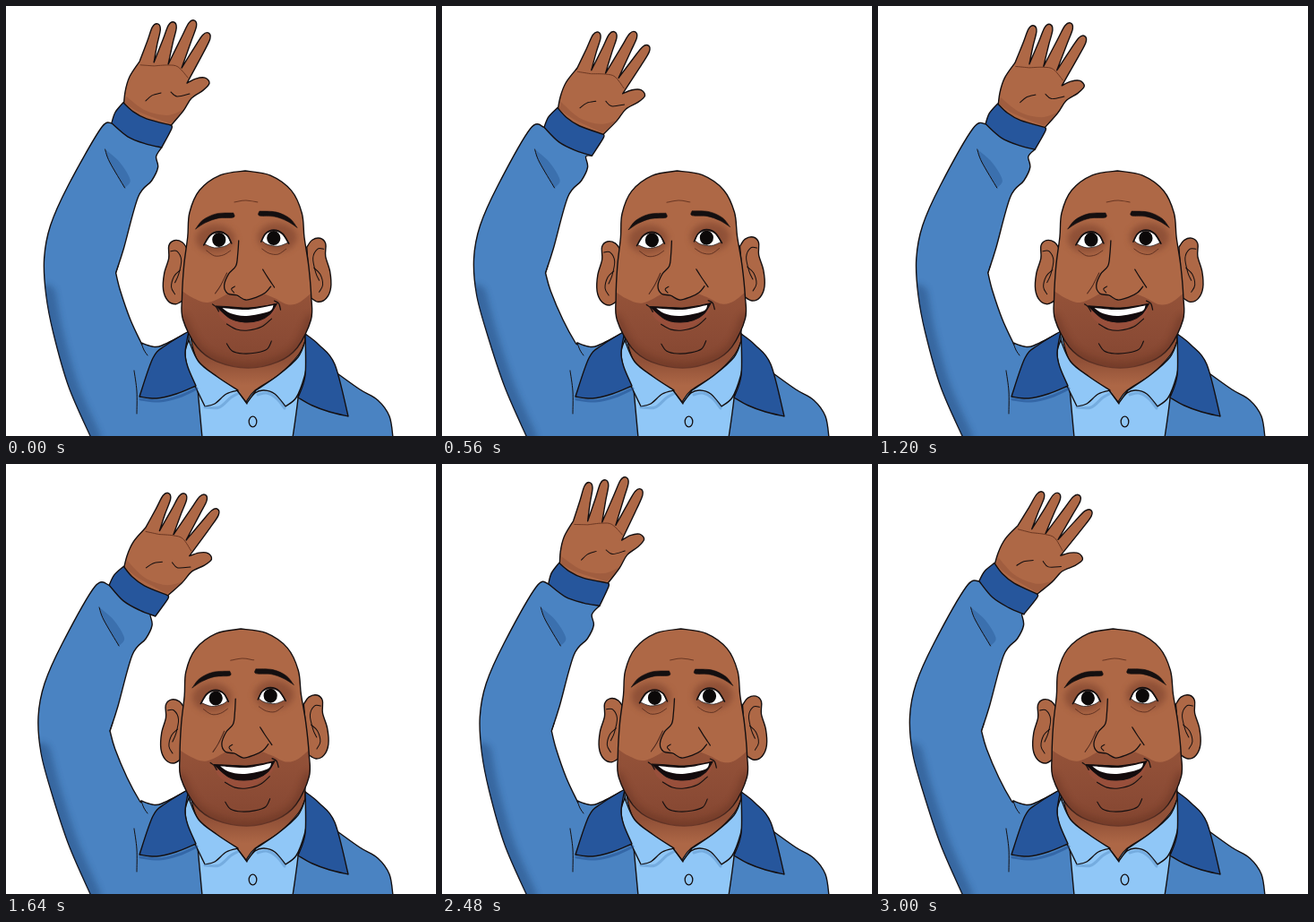
Animation, 480 px wide and 480 px high, one loop 3040 ms. Source, as an HTML page:

```html
<!DOCTYPE html>
<html lang="en">
<head>
<meta charset="utf-8">
<title>Waving man</title>
<style>
html, body { margin: 0; width: 100%; height: 100%; overflow: hidden; background: #fff; }
svg { display: block; width: 100vw; height: 100vh; }
path, ellipse { stroke-linejoin: round; stroke-linecap: round; }
</style>
</head>
<body>
<svg viewBox="0 0 480 480">
  <defs>
    <linearGradient id="beard" x1="0" y1="0" x2="0" y2="1">
      <stop offset="0" stop-color="#955339"/>
      <stop offset=".6" stop-color="#8b4b35"/>
      <stop offset="1" stop-color="#82452f"/>
    </linearGradient>
    <linearGradient id="neck" x1="0" y1="0" x2="0" y2="1">
      <stop offset=".5" stop-color="#905037"/>
      <stop offset=".8" stop-color="#ad6746"/>
    </linearGradient>
    <linearGradient id="headEdge" x1="0" y1="0" x2="0" y2="1">
      <stop offset=".85" stop-color="#140f10"/>
      <stop offset="1" stop-color="#6b3828"/>
    </linearGradient>
    <filter id="soft" x="-40%" y="-40%" width="180%" height="180%"><feGaussianBlur stdDeviation="3.5"/></filter>
    <clipPath id="jacketClip"><path id="jacketClipPath"/></clipPath>
    <clipPath id="headClip"><path id="headClipPath"/></clipPath>
  </defs>
  <g id="jacket"></g>
  <g id="torso"></g>
  <g id="head"></g>
  <g id="hand"></g>
</svg>
<script>
const LOOP = 3040, STEP = 40, SWING = 1225, PEAK = 2360;
const INK = '#140f10', SKIN = '#ae6846', BLUE = '#4a83c2', NAVY = '#26569c', SHIRT = '#90c7f7';
const byId = id => document.getElementById(id);
const round = n => Math.round(n * 100) / 100;
const parse = text => text.trim().split(/\s+/).map(p => p.split(',').map(Number));

// Smooth curve through points; continues from the current pen position.
function spline(pts) {
  let d = '';
  for (let i = 0; i < pts.length - 1; i++) {
    const a = pts[i - 1] || pts[i], b = pts[i], c = pts[i + 1], e = pts[i + 2] || c;
    d += 'C' + [b[0] + (c[0] - a[0]) / 6, b[1] + (c[1] - a[1]) / 6,
      c[0] - (e[0] - b[0]) / 6, c[1] - (e[1] - b[1]) / 6, c[0], c[1]].map(round).join(' ');
  }
  return d;
}

// Each run is smooth; runs meet in corners.
function joinRuns(runs) {
  let last = null, d = 'M' + runs[0][0].map(round).join(' ');
  for (const run of runs) {
    d += spline(last ? [last, ...run] : run);
    last = run[run.length - 1];
  }
  return d;
}
const toRuns = text => text.split('|').map(parse);
const trace = text => joinRuns(toRuns(text));

function add(parent, tag, attrs) {
  const el = document.createElementNS('http://www.w3.org/2000/svg', tag);
  for (const key in attrs) el.setAttribute(key, attrs[key]);
  return (parent.nodeType ? parent : byId(parent)).appendChild(el);
}
const shape = (parent, text, fill, width = 1.4, extra = {}) =>
  add(parent, 'path', { d: trace(text) + 'Z', fill, stroke: width ? INK : 'none', 'stroke-width': width, ...extra });
const line = (parent, text, width = 1.1, extra = {}) =>
  add(parent, 'path', { d: trace(text), fill: 'none', stroke: INK, 'stroke-width': width, ...extra });
const oval = (parent, cx, cy, rx, ry, fill, extra = {}) =>
  add(parent, 'ellipse', { cx, cy, rx, ry, fill, ...extra });

// Draws a left-hand part and its mirror image.
function pair(parent, width, lift, draw) {
  draw(add(parent, 'g', {}));
  draw(add(parent, 'g', { transform: `translate(${width} ${-lift}) scale(-1 1)` }));
}

// Jacket
const OUTER = parse('106,137 70,200 50,245 43,282 45,322 53,365 70,425 95,482');
const INNER = parse('151,376 139,350 128,318 123,298 132,270 148,213 163,195 170,180 168,168');
const FOLD = parse('111,160 116,174 133,203');
const SHOULDERS = toRuns('432,482 | 428,458 415,440 395,428 367,408 | 334,366 | 204,364 | 174,379 163,380 151,376');
const jacket = add('jacket', 'path', { fill: BLUE, stroke: INK, 'stroke-width': 1.4 });
const armShade = add('jacket', 'path', { fill: 'none', stroke: '#1f406f', 'stroke-width': 22, opacity: .4,
  filter: 'url(#soft)', 'clip-path': 'url(#jacketClip)' });
const foldShade = add('jacket', 'path', { fill: '#386ca9', opacity: .8 });
const fold = add('jacket', 'path', { fill: 'none', stroke: INK });
const elbow = add('jacket', 'path', { fill: 'none', stroke: INK });
line('jacket', '151,376 154,384 158,390', 1);
line('jacket', '143,407 146,430 146,455', 1);

// Neck, shirt and collars
shape('torso', '203,364 214,428 | 219,482 | 320,482 | 326,438 333,366', SHIRT);
shape('torso', '204,360 213,394 234,413 258,429 | 268,442 | 278,429 304,412 326,390 334,374 | 334,350 | 204,350', 'url(#neck)', 1.2);
shape('torso', '204,373 200,387 204,408 222,447 | 233,444 246,433 259,429 | 236,414 215,397 204,373', SHIRT);
shape('torso', '334,374 326,392 304,412 279,429 | 269,443 | 278,432 288,429 300,433 312,447 | 324,437 333,414 338,388', SHIRT);
line('torso', '222,448 238,448 251,437 260,432', 3, { stroke: '#659bd0', opacity: .6 });
line('torso', '281,434 291,432 302,438 311,449', 3, { stroke: '#659bd0', opacity: .6 });
line('torso', '258,429 269,444', 1.3);
oval('torso', 275.5, 464, 4.3, 5.8, SHIRT, { stroke: INK, 'stroke-width': 1.3 });
shape('torso', '204,363 178,379 164,393 149,436 | 168,438 190,433 212,424 | 203,403 200,387 204,363', NAVY);
shape('torso', '334,366 349,378 367,400 382,458 | 361,453 342,446 326,437 | 334,412 334,366', NAVY);
line('torso', '150,439 171,441 193,436 213,427', 3, { stroke: '#1f4d8d', opacity: .5 });

// Head: one traced side, the other reflected in a slightly leaning axis
const half = parse('266,184 238,189 215,206 204,231 202,258 198,290 196,325 197,350 213,381 235,397 270,404');
const reflected = half.slice(1, -1).reverse().map(([x, y]) => [532 + (y - 184) * .03 - x, y]);
const skull = joinRuns([[...half, ...reflected, half[0]]]);
const inHead = { 'clip-path': 'url(#headClip)' };
byId('headClipPath').setAttribute('d', skull);
pair('head', 537, 3, ear => {
  shape(ear, '202,272 196,264 187,262 181,268 181,282 176,299 175,317 180,329 189,333 198,328', SKIN);
  line(ear, '183,274 190,274 195,284 192,300 188,309', 1);
  line(ear, '194,295 187,302 184,314 188,322', 1);
});
add('head', 'path', { d: skull, fill: SKIN });
shape('head', '190,314 208,326 226,331 249,320 | 268,328 287,321 | 299,326 314,333 328,330 346,315 | 346,410 | 190,410',
  'url(#beard)', 0, inHead);
const jaw = add('head', 'g', inHead);
line(jaw, '196,350 212,381 235,397 270,404 304,397 326,381 340,350', 12, { stroke: '#592a1c', opacity: .35, filter: 'url(#soft)' });
add('head', 'path', { d: skull, fill: 'none', stroke: 'url(#headEdge)', 'stroke-width': 1.4 });
line('head', '254,219 267,217 280,219', 1, { stroke: '#6b3824' });

// Eyes and brows
pair('head', 535, 2, eye => {
  oval(eye, 233, 260, 22, 16, '#763e2a', { opacity: .55, filter: 'url(#soft)' });
  shape(eye, '221,266 228,256 237,253 246,256 250,264 | 244,268 232,270 221,266', '#fff', .7);
  oval(eye, 237, 261, 7.6, 8, '#0c0909');
  line(eye, '220,267 227,256 237,252 246,256 251,265', 1.6);
  line(eye, '223,273 232,279 242,278 250,273', .9, { stroke: '#5b2e20' });
  shape(eye, '211,249 219,239 234,232 253,231 | 253,236 236,237 222,242 211,249', INK, .6);
});

// Nose and cheeks
line('head', '259,262 258,277 256,290 248,299 243,312 247,321 257,323 267,328 279,325 289,320 295,313', 1.3);
line('head', '286,294 291,302 299,314', 1.2);
line('head', '255,313 251,316 254,320', 1);
line('head', '246,298 239,312 233,321', 1, { stroke: '#4b271d' });

// Mouth and chin
shape('head', '235,335 268,338 301,331 | 297,346 268,362 241,350 235,335', '#984f3b', 0);
shape('head', '234,335 252,336 270,337 287,335 302,332 | 294,344 282,351 266,353 250,349 234,335', '#130b0d', 1);
shape('head', '241,337 270,339 298,334 | 293,341 268,346 250,343 241,337', '#fff', 0);
line('head', '230,333 234,336 237,341', 1.2);
line('head', '299,329 304,332 306,339', 1.2);
line('head', '246,355 257,361 270,362 285,358 296,349');
line('head', '246,377 252,385 264,388 279,387 291,383 296,374');

// Hand: every finger is a rounded taper from its base to its tip
const WRIST = [157, 122], BASE_ANGLE = 26;
const TIPS = parse('169,20 187,18 210,16 226,30');
const BASES = parse('149,62 165,63 181,65 196,69 202,86');
const fingers = TIPS.map(([x, y], i) => {
  const a = BASES[i], b = BASES[i + 1];
  const dx = x - (a[0] + b[0]) / 2, dy = y - (a[1] + b[1]) / 2, len = Math.hypot(dx, dy);
  const ux = dx / len, uy = dy / len;
  const side = (back, out) => [x - ux * back - uy * out, y - uy * back + ux * out];
  return [side(22, -5.8), side(5, -4.6), [x, y], side(5, 4.6), side(22, 5.8), b];
});
add('hand', 'path', { fill: SKIN, stroke: INK, 'stroke-width': 1.4, d: joinRuns([
  parse('131,118 133,96 138,79 149,62'), ...fingers,
  parse('212,81 222,80 227,86 220,94 207,103 198,117 182,136'), parse('158,142')]) + 'Z' });
shape('hand', '133,109 150,119 183,131 | 192,124 198,116 | 180,122 156,117 134,101', '#7f432e', 0, { opacity: .3 });
line('hand', '156,106 163,100 173,97', 1);
line('hand', '184,96 191,101 205,98', 1);
line('hand', '150,66 165,67 | 181,66 192,68 203,80', .9, { stroke: '#683521' });
shape('hand', '131,108 142,118 157,126 184,133 | 185,137 174,158 | 156,154 136,146 118,131 | 122,119 131,108', NAVY);
const CUFF_ENDS = [[118, 131], [174, 158]];

const swing = t => Math.cos(2 * Math.PI * (t - PEAK) / SWING);

// The arm swings steadily while the hand's turn grows over the loop.
function poseAt(t) {
  const u = t / LOOP, drift = -Math.cos(2 * Math.PI * u), early = swing(t + 60);
  return {
    sway: (1 + swing(t)) / 2,
    angle: 29.4 - (2 + 7 * u * u) * swing(t) + 1.4 * drift,
    wx: 156.3 + 2.5 * early + 1.2 * drift,
    wy: 126.3 - 4.5 * early + 1.2 * drift,
    tilt: -.2 + .55 * early
  };
}

function render(t) {
  const { sway, angle, wx, wy, tilt } = poseAt(t);
  const turn = angle - BASE_ANGLE, rad = turn * Math.PI / 180;
  const place = ([x, y]) => {
    const dx = x - WRIST[0], dy = y - WRIST[1];
    return [wx + dx * Math.cos(rad) - dy * Math.sin(rad), wy + dx * Math.sin(rad) + dy * Math.cos(rad)];
  };
  const bend = ([x, y]) => [x - 7.5 * (1 - sway) * Math.min(1, Math.max(0, (400 - y) / 90)), y];
  const [cuffLeft, cuffRight] = CUFF_ENDS.map(place);
  const outer = OUTER.map(bend), inner = INNER.map(bend), crease = FOLD.map(bend);
  const d = joinRuns([[cuffLeft, ...outer], ...SHOULDERS, inner.slice(0, 4), [...inner.slice(4), cuffRight]]) + 'Z';
  jacket.setAttribute('d', d);
  byId('jacketClipPath').setAttribute('d', d);
  armShade.setAttribute('d', joinRuns([outer.slice(4)]));
  fold.setAttribute('d', joinRuns([crease]));
  const [foldTop, foldMid, foldEnd] = crease;
  foldShade.setAttribute('d', joinRuns([crease, [[foldEnd[0] + 6, foldEnd[1] - 9], [foldMid[0] + 11, foldMid[1]], foldTop]]) + 'Z');
  const [ex, ey] = inner[3];
  elbow.setAttribute('d', joinRuns([[[ex, ey], [ex + 3, ey - 9]]]));
  byId('hand').setAttribute('transform',
    `translate(${round(wx)} ${round(wy)}) rotate(${round(turn)}) translate(${-WRIST[0]} ${-WRIST[1]})`);
  byId('head').setAttribute('transform', `rotate(${round(tilt)} 268 480)`);
}

function tick() {
  const t = performance.now() % LOOP;
  render(Math.floor(t / STEP) * STEP);
  requestAnimationFrame(tick);
}
tick();
</script>
</body>
</html>
```
